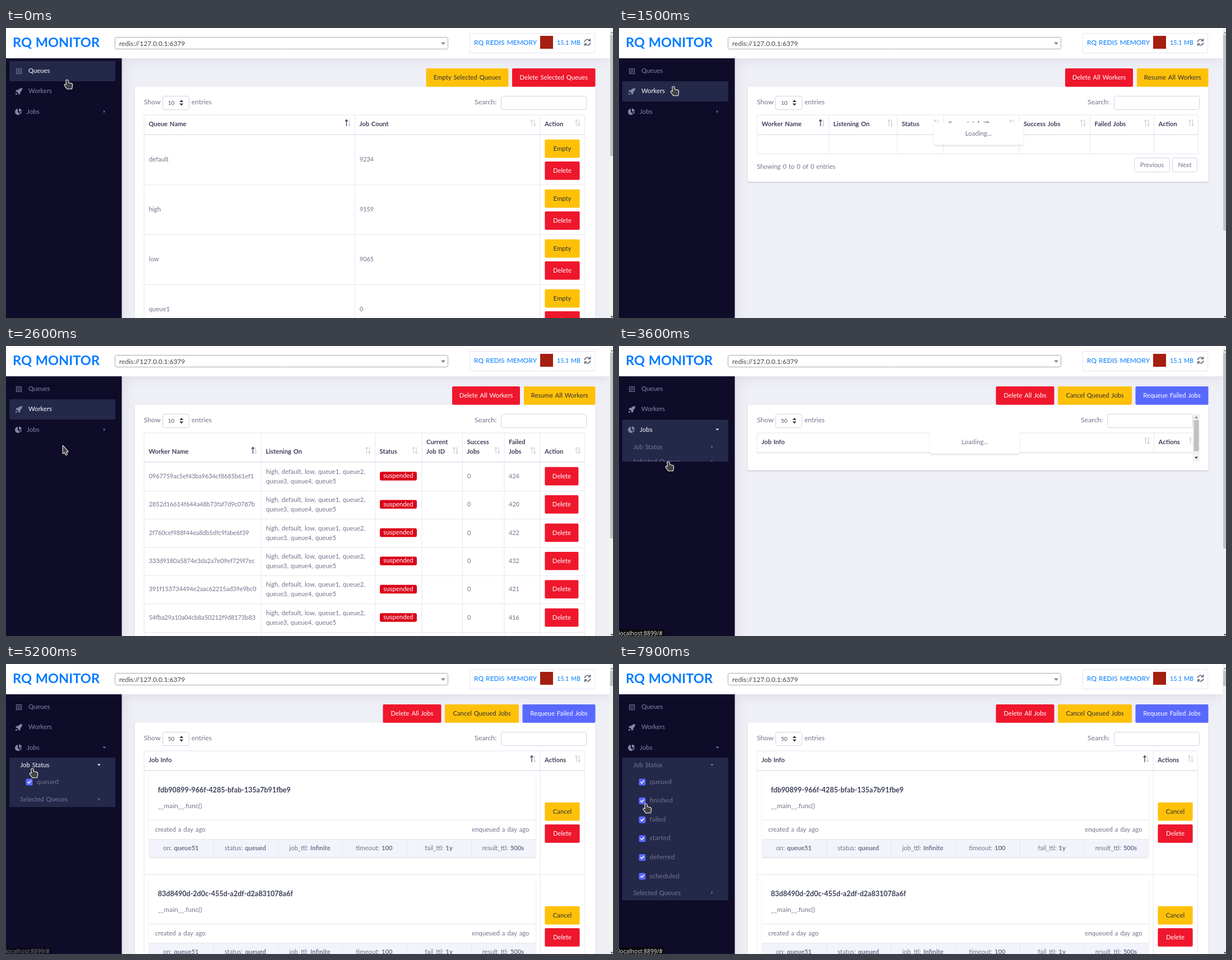
An HTML page with a canvas for the animation above (8 s loop, 1083 by 517 pixels).

```html
<!DOCTYPE html>
<html lang="en">
<head>
<meta charset="utf-8">
<title>RQ Monitor</title>
<style>
html, body { margin: 0; width: 100%; height: 100%; overflow: hidden; background: #efeff6; }
canvas { display: block; }
</style>
</head>
<body>
<canvas id="stage" width="1083" height="517"></canvas>
<script>
const c = document.getElementById('stage').getContext('2d');
const LOOP = 8000;
const RED = '#ef172c', YELLOW = '#ffc108', INDIGO = '#5969ff', BLUE = '#007bff';
const INK = '#3d405c', GREY = '#71748d', LINE = '#e6e6f2', FIELD = '#d2d2e4';
const NAVY = '#0e0c28', PANEL = '#242849', NAV = '#8287a9', NAV_DIM = '#7478a0';
const GLOW = 'rgba(82,63,105,.13)';

// Held steps: [time, value...]
const cursorSteps = [
  [0, 109, 92, 'hand'], [100, 109, 94, 'arrow'], [400, 113, 106, 'hand'],
  [800, 109, 106, 'hand'], [900, 102, 105, 'hand'], [1000, 97, 104, 'hand'],
  [1900, 98, 107, 'hand'], [2000, 99, 113, 'hand'], [2100, 100, 122, 'hand'],
  [2200, 100, 133, 'hand'], [2300, 101, 147, 'hand'], [2400, 102, 160, 'hand'],
  [2500, 102, 171, 'arrow'], [2600, 101, 177, 'arrow'], [3600, 88, 206, 'hand'],
  [3800, 62, 220, 'arrow'], [4200, 52, 237, 'arrow'], [4400, 45, 245, 'arrow'],
  [4600, 43, 232, 'arrow'], [4700, 42, 220, 'arrow'], [5000, 47, 180, 'hand'],
  [5200, 47, 186, 'hand'], [5400, 49, 208, 'hand'], [5600, 51, 229, 'hand'],
  [5800, 69, 268, 'hand'], [6100, 42, 283, 'hand'], [6600, 42, 277, 'hand'],
  [7500, 46, 260, 'hand'], [7600, 58, 236, 'hand'], [7700, 69, 219, 'hand'],
  [7900, 48, 249, 'hand']
];
const statusAlpha = [[0, 0], [3600, 1], [4200, .5], [4400, 0], [5200, .5], [5400, 1]];
const menuBottom = [[3600, 206], [4000, 220], [5200, 255], [5400, 378], [5600, 421.5]];

const at = (steps, t) => steps.findLast(s => s[0] <= t);
const during = (t, a, b) => t >= a && t < b;

function rect(x, y, w, h, fill, r = 0) {
  c.fillStyle = fill;
  c.beginPath();
  c.roundRect(x, y, w, h, r);
  c.fill();
}

function frame(x, y, w, h, color, r = 0) {
  c.strokeStyle = color;
  c.lineWidth = 1;
  c.beginPath();
  c.roundRect(x + .5, y + .5, w - 1, h - 1, r);
  c.stroke();
}

function shadowed(blur, color, drop, draw) {
  c.save();
  c.shadowBlur = blur;
  c.shadowColor = color;
  c.shadowOffsetY = drop;
  draw();
  c.restore();
}

// y is the middle of the line
function text(s, x, y, color = GREY, size = 11.3, weight = 400, align = 'left') {
  c.font = `${weight} ${size}px Lato, "Open Sans", sans-serif`;
  c.wordSpacing = '1px';
  c.textAlign = align;
  c.fillStyle = color;
  c.fillText(s, x, y + 4);
}

function shape(d, x, y, fill, stroke, width = 1) {
  const path = new Path2D(d);
  c.save();
  c.translate(x, y);
  c.lineJoin = c.lineCap = 'round';
  if (stroke) { c.strokeStyle = stroke; c.lineWidth = width; c.stroke(path); }
  if (fill) { c.fillStyle = fill; c.fill(path); }
  c.restore();
}

function button(s, x, y, w, fill) {
  rect(x, y, w, 32.7, fill, 2);
  text(s, x + w / 2, y + 16, fill === YELLOW ? '#2e2f39' : '#fff', 11.3, 400, 'center');
}

const action = (s, y, fill) => button(s, 961.4, y, 62.2, fill);

function field(s, x, y, w, h) {
  rect(x, y, w, h, '#fff', 3);
  frame(x, y, w, h, FIELD, 3);
  text(s, x + w / 2, y + h / 2 - .5, GREY, 11.3, 400, 'center');
}

function sortIcon(x, y, active) {
  shape('M-2.5,6V-5M-4.5,-2.5L-2.5,-5L-.5,-2.5', x, y, null, active ? INK : '#c3c4d2', active ? 1.3 : 1);
  shape('M2.5,-5V6M.5,3.5L2.5,6L4.5,3.5', x, y, null, '#c3c4d2');
}

function card(x, y, w, h) {
  shadowed(2.5, 'rgba(4,26,55,.16)', 1.6, () => rect(x, y, w, h, '#fff', 3));
}

function loading(x, y) {
  card(x, y, 160, 40);
  text('Loading...', x + 80, y + 19, GREY, 11.5, 400, 'center');
}

function controls(count, shift = 0) {
  text('Show', 246, 132, GREY, 12.2);
  rect(279, 121, 48, 25, '#fff', 3);
  frame(279, 121, 48, 25, FIELD, 3);
  text(count, 289, 132.5, '#495057', 9.8);
  shape('M-3.5,-1L0,-5L3.5,-1ZM-3.5,1.5L0,5.5L3.5,1.5Z', 313, 133, '#343a40');
  text('entries', 331, 132, GREY, 12);
  text('Search:', 836 - shift, 132, GREY, 12.3);
  field('', 883 - shift, 121, 153, 25);
}

// cols: left edges plus the right edge; labels may hold two lines
function grid(cols, labels, head, bottom, sorted = 0) {
  const right = cols[cols.length - 1];
  rect(246, 154.5, right - 245, 1, LINE);
  rect(246, 154 + head, right - 245, 2, LINE);
  cols.forEach(x => rect(x, 155, 1, bottom - 155, LINE));
  labels.forEach((label, i) => {
    const lines = label.split('\n'), mid = 154 + head - 18;
    lines.forEach((s, k) => text(s, cols[i] + 8.5, mid - (lines.length - 1 - k) * 17, INK, 11.3, 700));
    sortIcon(cols[i + 1] - 12, mid - 2.5, i === sorted);
  });
}

const rowLine = (y, right = 1032) => rect(246, y, right - 245, 1, LINE);

function queuesPage(t) {
  button('Empty Selected Queues', 749.5, 72, 147, YELLOW);
  button('Delete Selected Queues', 903, 72, 148.5, RED);
  card(230, 105, 821.5, 430);
  controls('10');
  grid([246, 622, 952.5, 1032], ['Queue Name', 'Job Count', 'Action'], 35, 517);
  const counts = t < 500 ? [9234, 9159, 9065, 0] : [9227, 9152, 9058, 0];
  ['default', 'high', 'low', 'queue1'].forEach((name, i) => {
    const y = 190 + i * 89;
    text(name, 255, y + 44);
    text(counts[i], 631, y + 44, GREY, 10.8);
    action('Empty', y + 8.8, YELLOW);
    action('Delete', y + 48, RED);
    rowLine(y + 89);
  });
}

function workersHead() {
  button('Delete All Workers', 796, 72, 121, RED);
  button('Resume All Workers', 924, 72, 127.5, YELLOW);
}

function workersEmpty(t) {
  workersHead();
  card(230, 105, 821.5, 169);
  controls('10');
  grid([246, 374, 496, 578, 713.5, 840, 954, 1033],
    ['Worker Name', 'Listening On', 'Status', 'Current Job ID', 'Success Jobs', 'Failed Jobs', 'Action'], 35, 225);
  rowLine(224, 1033);
  text('Showing 0 to 0 of 0 entries', 246, 246.5);
  field('Previous', 919, 231, 64, 26);
  field('Next', 987, 231, 45, 26);
  if (t >= 1500) loading(561.5, 168.5);
}

const workers = [
  ['0967759ac5ef43ba9634cf8685b61ef1', 424], ['2852d16614f644a48b73faf7d9c0787b', 420],
  ['2f760cef988f44ea8db5dfc9fabe6f39', 422], ['333d9180a5874e3da2a7e09ef729f7ec', 432],
  ['391f153734494e2aac62215ad39e9bc0', 421], ['54fba29a10a04cb8a50212f9d8173b83', 416]
];

function workersPage(t) {
  workersHead();
  card(230, 105, 821.5, 430);
  controls('10');
  grid([246, 455, 658, 741.5, 814, 888.5, 952.5, 1032],
    ['Worker Name', 'Listening On', 'Status', 'Current\nJob ID', 'Success\nJobs', 'Failed\nJobs', 'Action'], 52, 517);
  workers.forEach(([id, failed], i) => {
    const y = 231.7 + i * 50.4;
    text(id, 255, y, GREY, 10.8);
    text('high, default, low, queue1, queue2,', 464, y - 8);
    text('queue3, queue4, queue5', 464, y + 9);
    rect(667, y - 7.5, 66, 15.5, '#da0419', 3);
    text('suspended', 700, y - .5, '#fff', 11.3, 400, 'center');
    text(0, 823, y, GREY, 10.8);
    text(failed, 897, y, GREY, 10.8);
    button('Delete', 961.4, y - 16, 60, RED);
    rowLine(Math.round(y + 26));
  });
  if (during(t, 2100, 2300)) loading(561.5, 397);
}

function jobsHead() {
  button('Delete All Jobs', 672.5, 72, 104, RED);
  button('Cancel Queued Jobs', 783, 72, 132, YELLOW);
  button('Requeue Failed Jobs', 921.5, 72, 130, INDIGO);
}

function jobsEmpty() {
  jobsHead();
  card(230, 105, 821.5, 116.5);
  c.save();
  c.beginPath();
  c.rect(230, 105, 794, 116);
  c.clip();
  controls('50', 12);
  grid([246, 954, 1034], ['Job Info', 'Actions'], 35, 190, -1);
  c.restore();
  rect(1024, 121, 12, 85, '#f1f1f1');
  rect(1025.5, 132, 9, 55.5, '#c1c1c1');
  shape('M-3,2L0,-2L3,2Z', 1030, 127, '#8a8a8a');
  shape('M-3,-2L0,2L3,-2Z', 1030, 199.5, '#404040');
  loading(555, 152);
}

const facts = [['on: ', 'queue51'], ['status: ', 'queued'], ['job_ttl: ', 'Infinite'],
  ['timeout: ', '100'], ['fail_ttl: ', '1y'], ['result_ttl: ', '500s']];

function fact([key, value], mid, y) {
  c.font = '400 11.3px Lato, "Open Sans", sans-serif';
  const a = c.measureText(key).width;
  c.font = '700 11.3px Lato, "Open Sans", sans-serif';
  const x = mid - (a + c.measureText(value).width) / 2;
  text(key, x, y);
  text(value, x + a, y, GREY, 11.3, 700);
}

function jobsPage() {
  jobsHead();
  card(230, 105, 821.5, 430);
  controls('50');
  grid([246, 952.5, 1032], ['Job Info', 'Actions'], 35, 517);
  ['fdb90899-966f-4285-bfab-135a7b91fbe9', '83d8490d-2d0c-455d-a2df-d2a831078a6f'].forEach((id, i) => {
    const y = 190 + i * 185;
    card(255, y + 9, 690, 145);
    text(id, 271, y + 35, INK, 12.55, 700);
    text('__main__.func()', 271, y + 63, GREY, 11.8);
    rect(255, y + 88, 690, 1, LINE);
    text('created a day ago', 266, y + 105);
    text('enqueued a day ago', 933.5, y + 105, GREY, 11.3, 400, 'right');
    rect(255, y + 123, 690, 31, '#f3f3fb', [0, 0, 3, 3]);
    rect(255, y + 122, 690, 1, LINE);
    facts.forEach((f, k) => {
      if (k) rect(Math.floor(255 + k * 115), y + 123, 1, 31, LINE);
      fact(f, 312 + k * 115, y + 137.5);
    });
    action('Cancel', y + 56.8, YELLOW);
    action('Delete', y + 96, RED);
    rowLine(y + 185);
  });
}

function header() {
  shadowed(22, GLOW, 0, () => rect(0, 0, 1077, 54, '#fff'));
  text('RQ MONITOR', 12, 29.5, BLUE, 23.6, 700);
  frame(194, 16, 595, 22, '#aaa', 3);
  text('redis://127.0.0.1:6379', 202, 27.5, '#444', 12);
  shape('M-4,-2L4,-2L0,2.5Z', 780, 27.5, '#888');
  frame(827, 9, 224, 36, LINE);
  text('RQ REDIS MEMORY', 835, 25.5, BLUE, 12);
  rect(953, 14, 23, 23, '#a41e11');
  text('15.1 MB', 983, 25.5, BLUE, 10.8);
  shape('M-5,-1A5.2,5.2 0 0 1 4,-3.5M5,1A5.2,5.2 0 0 1 -4,3.5M5,-6V-2.5H1.5M-5,6V2.5H-1.5', 1037.5, 25.5, null, '#686b80', 1.6);
}

function scrollbar(bottom) {
  rect(1077, 0, 6, 517, '#f1f1f1');
  rect(1078, 12, 5, bottom - 12, '#c1c1c1');
  shape('M-2.5,1.5L0,-1.5L2.5,1.5Z', 1081, 8, '#8a8a8a');
  shape('M-2.5,-1.5L0,1.5L2.5,-1.5Z', 1081, 515, '#404040');
}

const caret = (x, y, open, color) =>
  shape(open ? 'M-3,-1.5L3,-1.5L0,1.5Z' : 'M-1.3,-2.7L1.4,0L-1.3,2.7Z', x, y, color);

function sidebar(t) {
  shadowed(22, GLOW, 0, () => rect(0, 54, 206.6, 470, NAVY));
  const queues = t < 1300, work = during(t, 400, 3600);
  const open = t >= 3600, sub = t >= 5200;
  const jobs = during(t, 2200, 2500) || (open && !sub);
  const tint = on => on ? '#fff' : NAV;
  const bar = y => rect(6, y, 189, 36, PANEL, 2);

  if (queues) bar(59);
  if (work) bar(95);
  if (jobs) bar(131.5);
  shape('M-4.5,-4.5H4.5V4.5H-4.5ZM-2.5,-2H2.5M-2.5,.3H2.5M-2.5,2.5H0M2,2.5H2.5', 23, 77, null, NAV_DIM, 1.1);
  text('Queues', 40, 76, tint(queues));
  shape('M6,-6Q1,-6 -1.5,-2.5L-4.5,-2.5L-6,.5L-3.5,.7L-.8,3.4L-.5,6L2.5,4.5V1.5Q6,-1 6,-6ZM-5,2.5Q-6.5,4 -6,6Q-4,6 -2.6,4.8Z', 23, 113, NAV);
  text('Workers', 40, 112, tint(work));
  shape('M-1,-5.5A5.5,5.5 0 1 0 3.2,4L-1,.2ZM1,-6V-.8H6A5.5,5.5 0 0 0 1,-6ZM1.3,.7L4.6,3.6Q6,2.3 6,.7Z', 22, 149.5, NAV);
  text('Jobs', 37, 148.5, tint(jobs), 11.6);
  caret(175.5, 149, open, jobs ? '#fff' : NAV_DIM);
  if (!open) return;

  const bottom = at(menuBottom, t)[1];
  c.save();
  c.beginPath();
  c.rect(6, 131, 189, bottom - 131);
  c.clip();
  rect(6, 167, 189, bottom - 167, PANEL);
  const lit = during(t, 5000, 7600);
  text('Job Status', 25.5, 179.5, lit ? '#fff' : NAV_DIM);
  caret(166, 180, sub, lit ? '#fff' : NAV_DIM);
  const last = sub ? bottom - 14 : 206;
  text('Selected Queues', 25.5, last, NAV_DIM);
  caret(166, last, false, NAV_DIM);
  if (sub) {
    c.beginPath();
    c.rect(6, 190, 189, last - 198);
    c.clip();
    ['queued', 'finished', 'failed', 'started', 'deferred', 'scheduled'].forEach((s, i) => {
      const y = 210 + i * 33.6;
      rect(35.5, y - 5.5, 12, 12, INDIGO, 2.5);
      shape('M-2.8,0L-.8,2L2.8,-2.2', 41.5, y + .5, null, '#fff', 1.5);
      text(s, 54.5, y - .5, GREY, 12);
    });
  }
  c.restore();
}

function statusBar(alpha) {
  if (!alpha) return;
  c.save();
  c.globalAlpha = alpha;
  rect(0, 505, 82, 12, '#0a0a0c');
  c.font = '10.1px "Noto Sans", "Open Sans", sans-serif';
  c.textAlign = 'left';
  c.fillStyle = '#e8e8e8';
  c.fillText('localhost:8899/#', -1, 516);
  c.restore();
}

const pointers = {
  hand: 'M-1.7,1.6Q0,-.8 1.7,1.6L2.2,6L7.5,7Q9.5,7.6 9.2,10.5L8.2,16.3H.3L-4.3,10.2Q-4.6,8 -2.6,8.6L-1,10Z',
  arrow: 'M.6,1V14.5L3.6,12L5.8,17.2L8,16.2L6,11.2H9.6Z'
};

function draw(t) {
  rect(0, 0, 1083, 517, '#efeff6');
  sidebar(t);
  header();
  const [, page, thumb] = at([
    [0, queuesPage, 228], [1400, workersEmpty, 361], [1600, workersPage, 343],
    [3600, jobsEmpty, 361], [4000, jobsPage, 39]
  ], t);
  page(t);
  scrollbar(thumb);
  statusBar(at(statusAlpha, t)[1]);
  const [, x, y, kind] = at(cursorSteps, t);
  shape(pointers[kind], x, y, '#444', '#fff', 2);
}

function tick() {
  draw(performance.now() % LOOP);
  requestAnimationFrame(tick);
}
tick();
</script>
</body>
</html>
```
